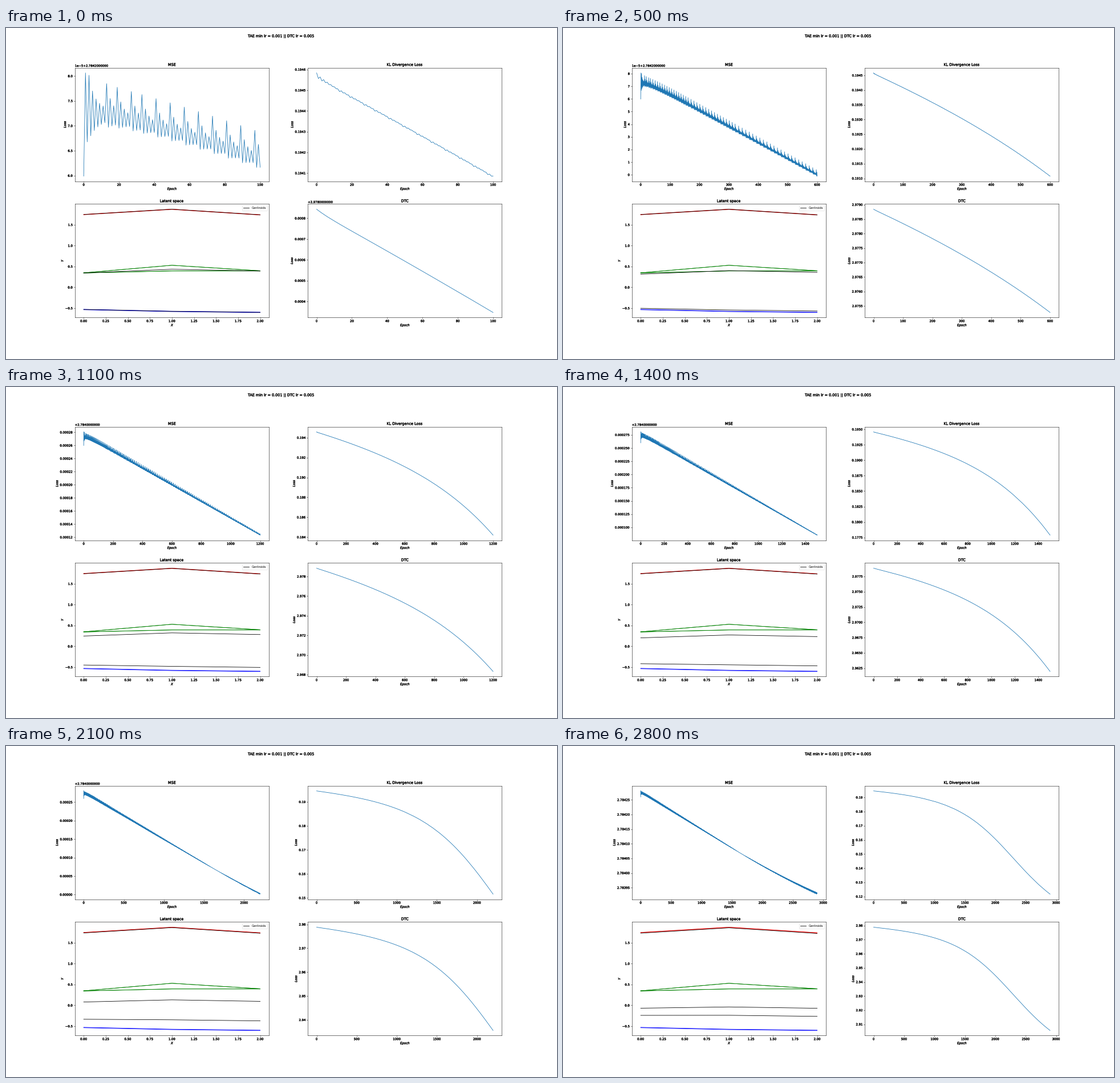
Animation of 966 by 580 pixels, one loop 2900 ms. Source, as a matplotlib script:

```python
import numpy as np
import matplotlib.pyplot as plt
from matplotlib.animation import FuncAnimation
from matplotlib.patheffects import withStroke
from matplotlib.ticker import ScalarFormatter

W, H, DPI = 966, 580, 38.64
FRAMES, STEP = 29, 100
LAST = FRAMES * STEP

plt.rcParams.update({
    "font.family": "DejaVu Sans",
    "axes.linewidth": 1.0,
    "xtick.major.width": 1.0,
    "ytick.major.width": 1.0,
})
HEAVY = [withStroke(linewidth=0.6, foreground="black")]


class LongOffset(ScalarFormatter):
    """Tick formatter that writes the axis offset with ten decimals."""

    def format_data(self, value):
        return f"{value:.10f}"


def burst_starts(end):
    """Odd epochs where the ripple flares up, with slowly widening gaps."""
    starts = [1, 3, 13, 19, 27, 33]
    while starts[-1] < end:
        starts.append(starts[-1] + min(12, 8 + 2 * (starts[-1] // 160)))
    return np.array(starts)


def zigzag(e):
    """Alternating ripple: decaying bursts that fade out, then flip over."""
    starts = burst_starts(e[-1])
    since = e - starts[np.searchsorted(starts, e, "right") - 1]
    j = np.maximum(since, 0) // 2
    high = 0.5 * 0.45 ** j + 0.22 * np.exp(-e / 10)
    low = -0.28 * 0.9 ** j - 0.6 * np.exp(-e / 5)
    z = np.where(e % 2 == 1, high, low) * (1 - e / 1650)
    z[0] = -1.38
    return z


def mse_trend(e):
    """Flat start, straight descent, gentle slowing in the second half."""
    late = np.maximum(e - 1500, 0) / 1400
    return 7.72 - 0.01278 * e - 0.35 * np.exp(-e / 45) + 2.4 * late ** 2


def kl_trend(e):
    """Slow linear descent plus a sigmoid drop, after a short transient."""
    mid, width = 2300, 920
    drop = np.tanh((e - mid) / width) + np.tanh(mid / width)
    return (0.194558 - 3.45e-6 * e - 0.0403 * drop
            + 1.2e-5 * np.exp(-e / 6))


epoch = np.arange(LAST + 1)
ripple = zigzag(epoch) * 1e-5
mse = 2.7842 + mse_trend(epoch) * 1e-5 + ripple
kl = kl_trend(epoch) - ripple
dtc = mse + kl

# Each cluster is a colour, its line and how far its two samples lie apart.
CLUSTERS = [
    ("r", [1.746, 1.873, 1.739], 0.004),
    ("g", [0.346, 0.394, 0.394], 0.001),
    ("g", [0.348, 0.530, 0.398], 0.0),
    ("b", [-0.532, -0.577, -0.600], 0.005),
]

# Each centroid is its first line, its total drift and the easing power.
CENTROIDS = [
    ([1.747, 1.875, 1.740], [-0.015, -0.015, -0.015], 1.5),
    ([0.345, 0.435, 0.392], [-0.413, -0.473, -0.462], 1.55),
    ([-0.530, -0.575, -0.600], [0.290, 0.337, 0.336], 1.35),
]

# A hair over the pixel size keeps rounding from losing a row or column.
fig, axes = plt.subplots(2, 2, dpi=DPI,
                         figsize=((W + 1e-6) / DPI, (H + 1e-6) / DPI))
fig.subplots_adjust(left=0.125, right=0.9, bottom=0.125, top=0.88,
                    wspace=0.2, hspace=0.2)
fig.suptitle("TAE min lr = 0.001 || DTC lr = 0.005", y=0.979,
             path_effects=HEAVY)


def label(ax, title, xlabel, ylabel):
    ax.set_title(title, path_effects=HEAVY)
    ax.set_xlabel(xlabel, style="italic", path_effects=HEAVY)
    ax.set_ylabel(ylabel, style="italic", path_effects=HEAVY)


def thicken_ticks(ax):
    for text in ax.get_xticklabels() + ax.get_yticklabels():
        text.set_path_effects(HEAVY)
    ax.yaxis.get_offset_text().set_path_effects(HEAVY)


curves = []
for ax, title, data in ((axes[0, 0], "MSE", mse),
                        (axes[0, 1], "KL Divergence Loss", kl),
                        (axes[1, 1], "DTC", dtc)):
    label(ax, title, "Epoch", "Loss")
    ax.yaxis.set_major_formatter(LongOffset())
    line, = ax.plot([], [], color="C0")
    curves.append((ax, line, data))

latent = axes[1, 0]
label(latent, "Latent space", "X", "Y")
steps = np.arange(3)
for color, values, spread in CLUSTERS:
    for side in (-1, 1):
        latent.plot(steps, np.add(values, side * spread), color=color)
centroids = [latent.plot(steps, start, color="k")[0]
             for start, _, _ in CENTROIDS]
centroids[0].set_label("Centroids")
latent.set_ylim(-0.726, 1.999)
latent.legend(loc="upper right")
thicken_ticks(latent)


def update(i):
    n = STEP * (i + 1) + 1
    for ax, line, data in curves:
        line.set_data(epoch[:n], data[:n])
        ax.relim()
        ax.autoscale_view()
        thicken_ticks(ax)
    u = i / (FRAMES - 1)
    for line, (start, drift, power) in zip(centroids, CENTROIDS):
        line.set_ydata(np.add(start, np.multiply(drift, u ** power)))
    return centroids + [line for _, line, _ in curves]


anim = FuncAnimation(fig, update, frames=FRAMES, interval=100,
                     init_func=lambda: update(0), repeat=True,
                     repeat_delay=0, blit=False)
plt.show()
```
